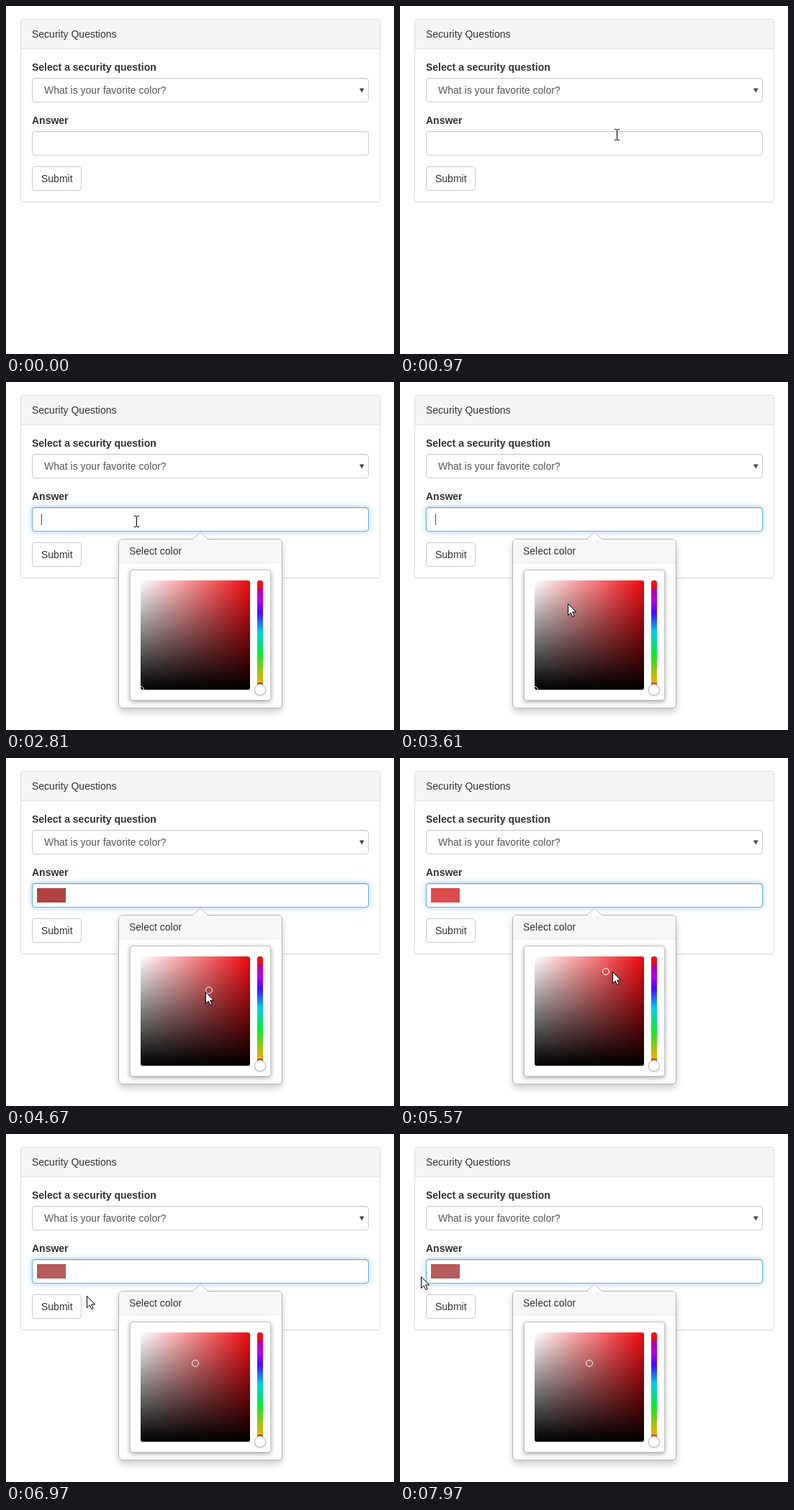
An HTML page for the animation above (8000 ms loop, 539 by 484 pixels).

```html
<!DOCTYPE html>
<html lang="en">
<head>
<meta charset="utf-8">
<title>Security Questions</title>
<style>
* { box-sizing: border-box; }
html, body { margin: 0; width: 100%; height: 100%; overflow: hidden; background: #fff; }
body { position: relative; font: 14px/20px "Liberation Sans", Arial, sans-serif; color: #333; }
.panel { position: absolute; left: 20px; top: 18px; width: 500px; height: 255px; border: 1px solid #ddd;
  border-radius: 4px; box-shadow: 0 1px 1px rgba(0,0,0,.05); }
.heading { height: 41px; padding: 10px 15px; background: #f5f5f5; border-bottom: 1px solid #ddd; border-radius: 3px 3px 0 0; }
.body { padding: 15px; }
.label { margin-bottom: 5px; font-weight: bold; }
.control { position: relative; height: 34px; margin-bottom: 15px; padding: 6px 16px; color: #555;
  border: 1px solid #ccc; border-radius: 4px; box-shadow: inset 0 1px 1px rgba(0,0,0,.075); }
.control svg { position: absolute; left: 454px; top: 13px; }
.button { width: 69px; height: 34px; padding: 6px 12px; border: 1px solid #ccc; border-radius: 4px; }
#glow { position: absolute; inset: -1px; border: 1px solid #66afe9; border-radius: 4px;
  box-shadow: inset 0 1px 1px rgba(0,0,0,.075), 0 0 8px rgba(102,175,233,.6); }
#caret { position: absolute; left: 12px; top: 8px; width: 1px; height: 16px; background: #555; }
#swatch { position: absolute; left: 6px; top: 6px; width: 40px; height: 20px; }
#popover { position: absolute; left: 156px; top: 218px; width: 228px; height: 236px; background: #fff;
  border: 1px solid #b0b0b0; border-radius: 6px; box-shadow: 0 5px 10px rgba(0,0,0,.2); }
#popover .title { height: 33px; padding: 8px 14px; line-height: 16px; background: #f7f7f7;
  border-bottom: 1px solid #ebebeb; border-radius: 5px 5px 0 0; }
.tip { position: absolute; left: 101px; top: -11px; }
.picker { position: absolute; left: 15px; top: 42px; width: 196px; height: 182px; background: #fff;
  border: 1px solid #c4c4c4; border-radius: 4px; box-shadow: 0 2px 6px rgba(0,0,0,.35); }
.shade { position: absolute; left: 14px; top: 14px; width: 152px; height: 152px; border-radius: 3px; overflow: hidden;
  background: linear-gradient(transparent, #000), linear-gradient(90deg, #fff, #f00a10); }
#marker { position: absolute; left: -5px; top: -5px; width: 10px; height: 10px; border: 1.4px solid #fff; border-radius: 50%; }
.hue { position: absolute; left: 176px; top: 14px; width: 8px; height: 152px; border-radius: 3px;
  background: linear-gradient(#ee1115 7%, #b0009c 8%, #b800e6 18%, #4010ff 30%, #00d0e8 47%,
    #10e830 68%, #dcb400 90%, #dcb400 93%, #e04040 94%); }
.knob { position: absolute; left: 172px; top: 158px; width: 16px; height: 16px; background: #fff;
  border: 1px solid #bbb; border-radius: 50%; box-shadow: 0 1px 2px rgba(0,0,0,.2); }
#cursors { position: absolute; inset: 0; }
</style>
</head>
<body>
<div class="panel">
  <div class="heading">Security Questions</div>
  <div class="body">
    <div class="label">Select a security question</div>
    <div class="control">What is your favorite color?
      <svg width="7" height="7"><path d="M0 .5h6.6L3.3 6.5z" fill="#444"/></svg>
    </div>
    <div class="label">Answer</div>
    <div class="control"><div id="glow"></div><div id="caret"></div><div id="swatch"></div></div>
    <div class="button">Submit</div>
  </div>
</div>
<div id="popover">
  <div class="title">Select color</div>
  <svg class="tip" width="24" height="12"><path d="M1 11.5L12 .5L23 11.5" fill="#fff" stroke="#b8b8b8"/></svg>
  <div class="picker">
    <div class="shade"><div id="marker"></div></div>
    <div class="hue"></div><div class="knob"></div>
  </div>
</div>
<svg id="cursors" width="539" height="484">
  <path id="arrow" d="M.5 .5V16.5L4.2 13L6.8 18.6L9.2 17.5L6.7 12H11.6z" fill="#fff" stroke="#000"/>
  <path id="beam" d="M-3-7.5h3M1-7.5h3M.5-7V7M-3 7.5h3M1 7.5h3" fill="none" stroke="#000"/>
</svg>
<script>
const LOOP = 8000, APPEAR = 130, CLICK = 2610, OPEN = 2720, PRESS = 4590, RELEASE = 6270;
const LEFT = 187, TOP = 276, SIZE = 152, LAG = 40;

// Each pointer move: begin, end, then where it comes to rest
const origin = [455, 433];
const moves = [
  [APPEAR, 930, 301, 179], [970, 1530, 188, 127], [1850, 2190, 181, 194],
  [3030, 3830, 237, 317], [3890, 4030, 249, 329], [4210, 4450, 287, 322],
  [PRESS, 4910, 265, 328], [5050, 5250, 265, 296], [5470, 5670, 305, 297],
  [5910, RELEASE, 263, 319], [6510, 7070, 107, 222],
  [7300, 7310, 90, 192], [7310, 7700, 4, 198], [7700, 7970, 29, 198]
];
const $ = id => document.getElementById(id);
const show = (id, on) => $(id).style.visibility = on ? 'visible' : 'hidden';
const clamp = v => Math.max(0, Math.min(1, v));
const within = (t, from, to) => t >= from && t < to;
const easeOut = s => s * (2 - s);

function pointerAt(t) {
  let [x, y] = origin;
  for (const [begin, end, toX, toY] of moves) {
    const s = easeOut(clamp((t - begin) / (end - begin)));
    x += (toX - x) * s;
    y += (toY - y) * s;
  }
  return [Math.round(x), Math.round(y)];
}

function place(id, x, y) {
  $(id).style.transform = `translate(${x}px, ${y}px)`;
}

function draw(t) {
  const [x, y] = pointerAt(t);
  const visible = t >= APPEAR && !within(t, 7070, 7310);
  const inField = within(x, 36, 504) && within(y, 174, 208);
  show('arrow', visible && !inField);
  show('beam', visible && inField);
  place('arrow', x, y);
  place('beam', x, y);

  const fade = t < OPEN + 30 ? 0 : clamp((t - OPEN) / 90);
  $('glow').style.opacity = $('popover').style.opacity = fade;
  show('caret', within(t, CLICK, PRESS) && (t - CLICK) % 960 < 460);

  // The marker trails the pointer slightly while dragging
  const picked = t >= PRESS;
  const [mx, my] = picked ? pointerAt(Math.min(t - LAG, RELEASE)) : [LEFT, TOP + SIZE];
  place('marker', mx - LEFT, my - TOP);
  const value = 255 * (1 - (my - TOP) / SIZE), pale = value * (1 - (mx - LEFT) / SIZE);
  show('swatch', picked);
  $('swatch').style.background = `rgb(${value}, ${pale}, ${pale})`;
}

const start = performance.now();
function tick() {
  draw((performance.now() - start) % LOOP);
  requestAnimationFrame(tick);
}
tick();
</script>
</body>
</html>
```
